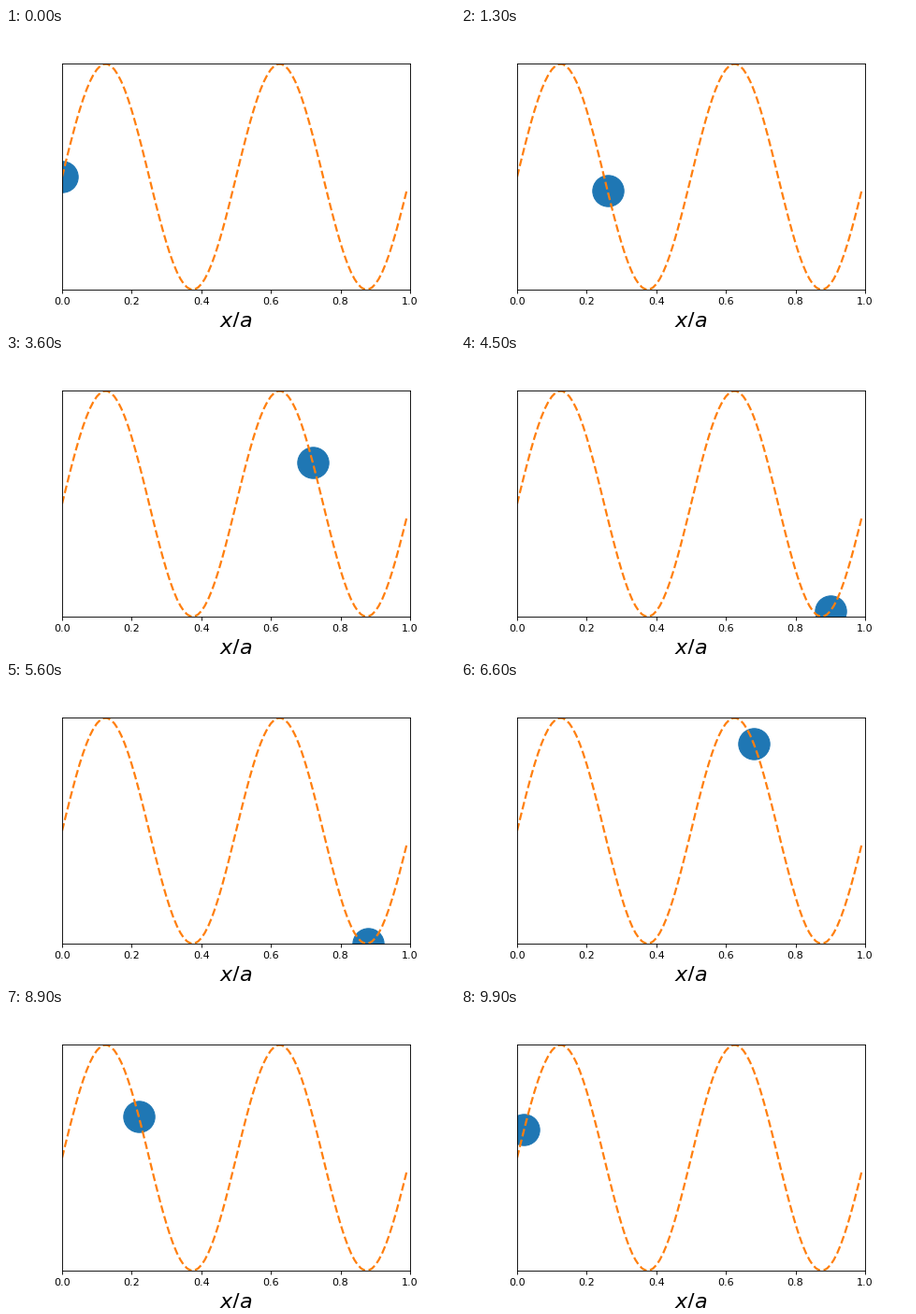
Write a matplotlib script that moves like this. It is 480 px wide and 320 px high and loops after 10 s.

```python
import numpy as np
import matplotlib.pyplot as plt
from matplotlib.animation import FuncAnimation

FRAMES = 100
INTERVAL = 100  # ms


def wave(x):
    return np.sin(4 * np.pi * x)


fig, ax = plt.subplots(figsize=(6, 4), dpi=80)
fig.subplots_adjust(left=0.125, right=0.9, bottom=0.125, top=0.88)
ax.set_xlim(0, 1)
ax.set_ylim(-1, 1)
ax.set_yticks([])
ax.set_xlabel("$x/a$", fontsize=20)

ball, = ax.plot([], [], "o", color="C0", markersize=30)
x = np.arange(0, 1, 0.01)
ax.plot(x, wave(x), "--", color="C1", linewidth=2)


def update(i):
    # the ball runs along the wave to the right edge and back
    pos = 1 - abs(1 - 2 * i / FRAMES)
    ball.set_data([pos], [wave(pos)])
    return ball,


anim = FuncAnimation(fig, update, frames=FRAMES, interval=INTERVAL,
                     repeat=True, repeat_delay=0)
plt.show()
```
